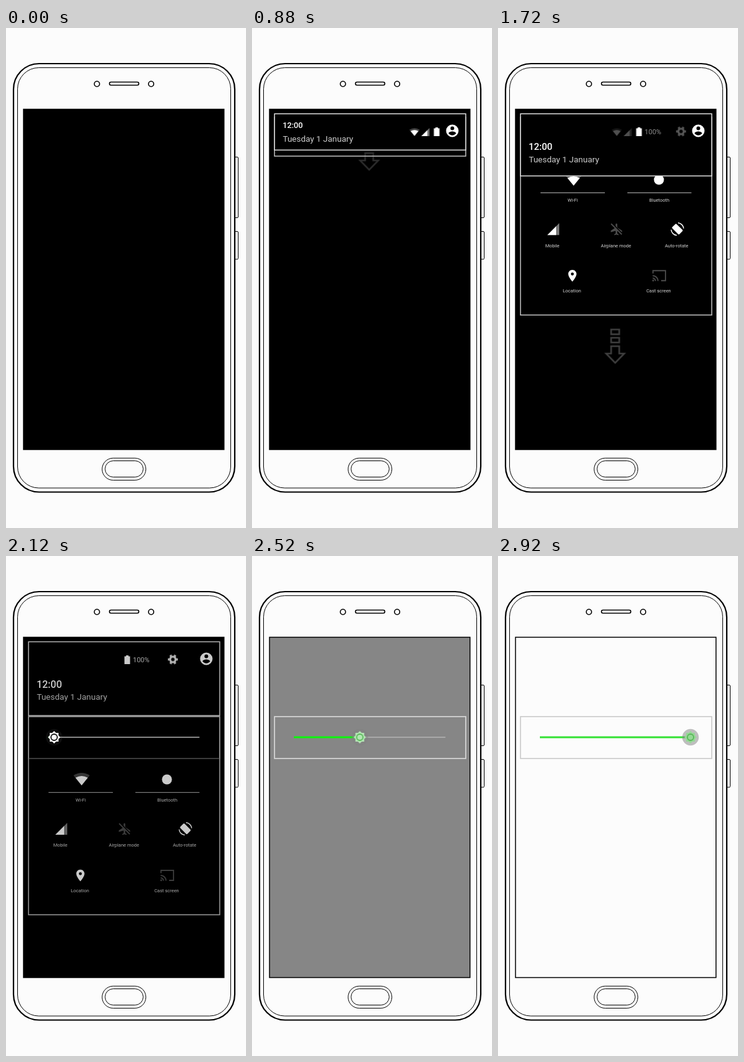
Animation, 384 px wide and 800 px high, one loop 3.4 s. Source, as an HTML page:

```html
<!DOCTYPE html>
<html lang="en">
<head>
<meta charset="utf-8">
<title>Quick settings brightness</title>
<style>
html, body { margin: 0; width: 100%; height: 100%; overflow: hidden; background: #fcfcfc; }
svg { display: block; width: 100vw; height: 100vh; font-family: Roboto, sans-serif; }
.line { fill: none; stroke: #000; }
.label { font-size: 7.5px; fill: #d4d4d4; text-anchor: middle; }
.arrow { fill: none; stroke: #aaa; stroke-width: 2.6; }
.off { fill: none; stroke: #4c4c4c; }

.screen, .shade, .panel, .head, .clock, .date, .status, .signals, .percent, .gear, .fade,
.pull1, .pull2, .thumb, .level, .frame, .halo, .star, .ring, .lit {
  animation: 3400ms linear infinite;
}

/* First pull: header drops in */
.pull1 { animation-name: pull1; }
@keyframes pull1 {
  0%, 3.529% { transform: translate(187.5px, 160px); opacity: 0; }
  7.059% { transform: translate(187.5px, 160px); opacity: 1; }
  11.765% { opacity: 1; }
  17.647%, 100% { transform: translate(187.5px, 331px); opacity: 0; }
}
.shade { animation-name: shade; }
@keyframes shade {
  0%, 10.588% { transform: translateY(-77px); }
  18.824%, 100% { transform: none; }
}

/* Second pull: panel expands */
.pull2 { animation-name: pull2; }
@keyframes pull2 {
  0%, 24.706% { transform: translate(187.5px, 229px); opacity: 0; }
  29.412% { opacity: 1; }
  32.941% { transform: translate(187.5px, 229px); }
  44.706% { opacity: 1; }
  54.118%, 100% { transform: translate(187.5px, 599px); opacity: 0; }
}
.panel { animation-name: panel; }
@keyframes panel {
  0%, 37.647% { transform: translateY(-369px); }
  56.471%, 100% { transform: none; }
}
.head { animation-name: head; }
@keyframes head {
  0%, 37.647% { height: 58px; }
  56.471%, 100% { height: 118px; }
}
.clock { animation-name: clock; }
@keyframes clock {
  0%, 37.647% { transform: translate(48.9px, 160px) scale(.8); }
  56.471%, 100% { transform: translate(48.9px, 210.6px) scale(1); }
}
.date { animation-name: date; }
@keyframes date {
  0%, 37.647% { transform: translate(49.2px, 182.2px); }
  56.471%, 100% { transform: translate(49.2px, 229.7px); }
}
.status { animation-name: status; }
@keyframes status {
  0%, 37.647% { transform: translate(295.5px, 166px); }
  56.471%, 100% { transform: translate(194px, 166px); }
}
.signals { animation-name: leave; }
@keyframes leave {
  0%, 37.647% { opacity: 1; }
  56.471%, 100% { opacity: 0; }
}
.percent { animation-name: enter; }
@keyframes enter {
  0%, 37.647% { opacity: 0; }
  56.471%, 100% { opacity: 1; }
}
.gear { animation-name: gear; }
@keyframes gear {
  0%, 47.059% { transform: translate(308.6px, 165.5px); opacity: 0; }
  56.471%, 100% { transform: translate(267px, 165.5px); opacity: 1; }
}

/* Brightness drag */
.fade { animation-name: fade; }
@keyframes fade {
  0%, 61.176% { opacity: 1; }
  67.059%, 100% { opacity: 0; }
}
.lit { animation-name: lit; }
@keyframes lit {
  0%, 61.176% { opacity: 0; }
  67.059%, 100% { opacity: 1; }
}
.screen { animation-name: screen; }
@keyframes screen {
  0%, 64.706% { fill: #000; }
  82.5%, 100% { fill: #fcfcfc; }
}
.frame { animation-name: frame; }
@keyframes frame {
  0%, 74.118% { stroke: #dcdcdc; }
  85.882%, 100% { stroke: #c8c8c8; }
}
.thumb { animation-name: thumb; }
@keyframes thumb {
  0%, 65.882% { transform: translate(77px, 290px); }
  85.882%, 100% { transform: translate(308px, 290px); }
}
.level { animation-name: level; }
@keyframes level {
  0%, 65.882% { width: 10px; fill: #0cf60c; }
  74.118% { fill: #0cf60c; }
  85.882%, 100% { width: 241px; fill: #34e234; }
}
.halo { animation-name: halo; }
@keyframes halo {
  0%, 61.176% { opacity: 0; }
  67.059%, 100% { opacity: .5; }
}
.star { animation-name: star; }
@keyframes star {
  0%, 62.353% { fill: #fff; }
  74.118% { fill: #b4e6b4; }
  85.882%, 100% { fill: #96d896; }
}
.ring { animation-name: ring; }
@keyframes ring {
  0%, 62.353% { stroke: #141414; }
  74.118%, 100% { stroke: #58b858; }
}
</style>
</head>
<body>
<svg viewBox="0 0 384 800">
  <defs>
    <clipPath id="glass"><rect x="28" y="130" width="321" height="544.5"/></clipPath>
    <clipPath id="below"><rect x="28" y="142" width="321" height="532"/></clipPath>
    <g id="arrow" class="arrow">
      <path d="M-6.5-28.7H6.5V-17H14.5L0-2-14.5-17H-6.5Z"/>
      <path d="M-6.5-55.5h13v7.6h-13zM-6.5-42.3h13v7.6h-13z"/>
    </g>
    <g id="wifi">
      <path d="M0 10L-13-6Q0-14 13-6Z" fill="#444"/>
      <path d="M0 10L-9.9-2.2Q0-8 9.9-2.2Z" fill="#fff"/>
    </g>
    <g id="cell">
      <path d="M-9.5 9.5L9.5-9.5V9.5Z" fill="#777"/>
      <path d="M-9.5 9.5L4.5-4.5V9.5Z" fill="#fff"/>
    </g>
  </defs>

  <!-- Phone body -->
  <rect width="384" height="800" fill="#fcfcfc"/>
  <g class="line">
    <rect x="12" y="57" width="354" height="685.5" rx="41" stroke-width="2.2"/>
    <rect x="18.5" y="63.5" width="341" height="672.5" rx="34"/>
    <path d="M366.5 206.5h3.5q1.5 0 1.5 1.5v94q0 1.5-1.5 1.5h-3.5M366.5 325.5h3.5q1.5 0 1.5 1.5v41.500q0 1.500-1.500 1.500h-3.500"/>
    <g stroke-width="1.6">
      <circle cx="145.500" cy="89.500" r="4.200"/>
      <circle cx="232.200" cy="89.500" r="4.200"/>
      <rect x="165.500" y="86.500" width="47" height="5" rx="2.500"/>
    </g>
    <rect x="153.800" y="688.200" width="70" height="35.300" rx="17.600"/>
    <rect x="158.500" y="692.500" width="61" height="26" rx="13"/>
  </g>
  <rect class="screen" x="28" y="130" width="320.800" height="544.500" stroke="#000" stroke-width="1.500"/>

  <g clip-path="url(#glass)">
    <g class="pull1"><use href="#arrow"/></g>

    <g class="shade">
      <g clip-path="url(#below)">
        <g class="panel">
          <g class="fade">
            <rect x="36" y="257" width="306" height="317" fill="none" stroke="#c4c4c4" stroke-width="1.500"/>
            <path d="M36 324H342" stroke="#484848"/>
            <path d="M68 378.300H171M207 378.300H309.500" stroke="#999" stroke-width="1.300"/>
            <use href="#wifi" x="121" y="357"/>
            <circle cx="257.500" cy="357.500" r="8" fill="#fff"/>
            <use href="#cell" x="88.500" y="436.500"/>
            <g transform="translate(189.500 436.500)">
              <path d="M-1.300-8Q0-10 1.300-8V-2.500L9 2.500V5L1.300 2.800V6.800L3.500 8.500V9.800L0 8.800-3.500 9.800V8.500L-1.300 6.800V2.800L-9 5V2.500L-1.300-2.500Z" fill="#4c4c4c"/>
              <path d="M-7-9L10 8" stroke="#000" stroke-width="2"/>
              <path class="off" d="M-8.500-8.500L8.500 8.500" stroke-width="1.800"/>
            </g>
            <g transform="translate(287 436.500)">
              <rect x="-4.800" y="-8" width="9.600" height="16" rx="1.300" transform="rotate(-45)" fill="#fff"/>
              <path d="M1-10A10 10 0 0 1 10-1M-1 10A10 10 0 0 1-10 1" fill="none" stroke="#fff" stroke-width="1.500"/>
            </g>
            <path transform="translate(119 511)" fill="#fff" fill-rule="evenodd" d="M0-9.300C-3.700-9.300-6.600-6.400-6.600-2.700C-6.600 2.300 0 9.500 0 9.500S6.600 2.300 6.600-2.700C6.600-6.400 3.700-9.300 0-9.300ZM0-5.100A2.400 2.400 0 1 1 0-.300A2.400 2.400 0 1 1 0-5.100Z"/>
            <g class="off" transform="translate(258 511)" stroke-width="1.800">
              <path d="M-10-3.500V-8H10V8H3M-10.500 0A8.500 8.500 0 0 1-2 8.500M-10.500 4A4.500 4.500 0 0 1-6 8.500"/>
              <circle cx="-9.700" cy="7.700" r=".6"/>
            </g>
            <g class="label">
              <text x="119.500" y="392.700">Wi-Fi</text>
              <text x="258" y="392.700">Bluetooth</text>
              <text x="87" y="465.300">Mobile</text>
              <text x="188.800" y="465.300">Airplane mode</text>
              <text x="285.700" y="465.300">Auto-rotate</text>
              <text x="118.300" y="538">Location</text>
              <text x="257" y="538">Cast screen</text>
            </g>
          </g>

          <g class="lit">
            <rect class="frame" x="36" y="257" width="306" height="67" fill="none" stroke-width="1.600"/>
          </g>
          <path d="M77 290H309.500" stroke="#b4b4b4" stroke-width="1.400"/>
          <g class="lit"><rect class="level" x="67" y="288.500" height="3"/></g>
          <g class="thumb">
            <circle class="halo" r="13.200" fill="#808080"/>
            <g class="star">
              <rect x="-7" y="-7" width="14" height="14"/>
              <rect x="-7" y="-7" width="14" height="14" transform="rotate(45)"/>
            </g>
            <circle class="ring" r="5" fill="none" stroke-width="1.800"/>
          </g>
        </g>
      </g>

      <g class="pull2"><use href="#arrow"/></g>

      <g class="fade">
        <rect class="head" x="36" y="137.300" width="306" fill="#000" stroke="#e0e0e0" stroke-width="1.500"/>
        <text class="clock" font-size="16" font-weight="500" fill="#fff">12:00</text>
        <text class="date" font-size="13.500" fill="#ccc">Tuesday 1 January</text>
        <g class="status">
          <g class="signals">
            <use href="#wifi" transform="translate(-35.500 .500) scale(.63)"/>
            <use href="#cell" transform="translate(-18 .500) scale(.68)"/>
          </g>
          <path d="M-4.500-5.500H-2V-7H2V-5.500H4.500V7H-4.500Z" fill="#fff"/>
          <text class="percent" x="9" y="4.300" font-size="11" fill="#ccc">100%</text>
        </g>
        <g class="gear" fill="none" stroke="#e4e4e4">
          <circle r="4.400" stroke-width="3.400"/>
          <circle r="6.700" stroke-width="2.600" pathLength="12" stroke-dasharray="1 1" stroke-dashoffset=".5"/>
        </g>
        <path transform="translate(308.500 152.500)" fill="#fff" fill-rule="evenodd" d="M12 2A10 10 0 1 0 12 22A10 10 0 1 0 12 2ZM12 5A3 3 0 1 1 12 11A3 3 0 1 1 12 5ZM12 19.200C9.500 19.200 7.300 17.900 6 16C6 14 10 12.900 12 12.900S18 14 18 16C16.700 17.900 14.500 19.200 12 19.200Z"/>
      </g>
    </g>
  </g>
</svg>
</body>
</html>
```
